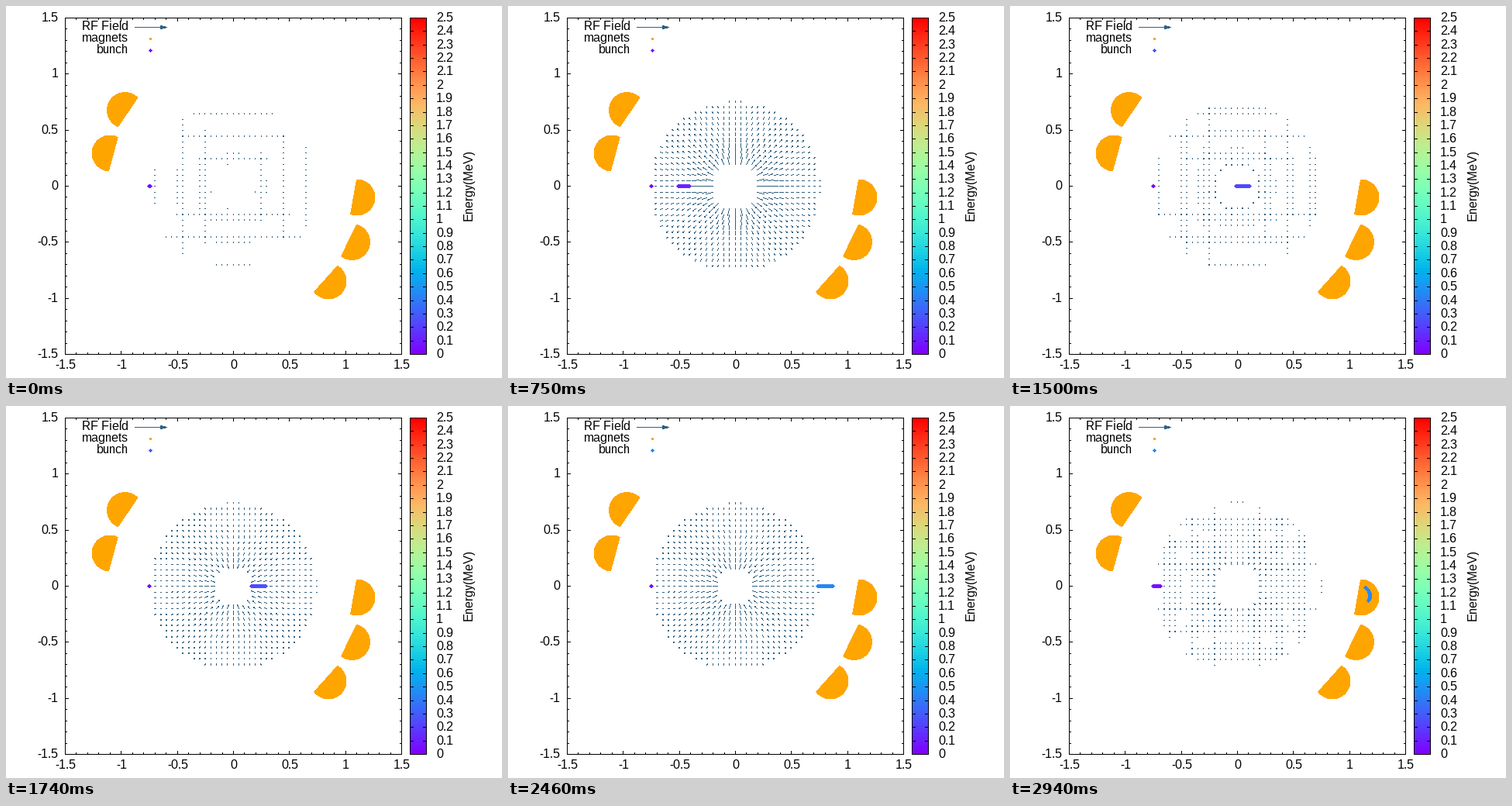
Recreate the animation shown at these times as a matplotlib script. Size 640 by 480 pixels, loop 2.97 s.

```python
import numpy as np
import matplotlib.pyplot as plt
from matplotlib.animation import FuncAnimation

W, H = 640, 480
FRAMES, STEP_MS = 99, 30
PERIOD, LAG = 93.02, 1.29                 # RF cycle and phase lag, in frames
LEFT, RIGHT, TOP, BOTTOM = 76, 510, 15, 449
CX, CY, UNIT = 293, 232, 434 / 3          # plot centre, px per axis unit
CELL = UNIT / 20
BAR_L, BAR_R, BAR_STEP = 521, 542, 434 / 25
STEEL, ORANGE, BLACK = (48, 96, 128), (255, 165, 0), (0, 0, 0)

FIELD_PX = 35                             # arrow length one cell from the centre
GAIN, T0, REST = 0.18, 0.04, 0.511        # MeV
LIGHT = 4.337                             # px per frame
SOURCE_X = 184.6
BEND_X, BEND_R = 451.5, 12.5              # entry and turning radius in the magnet


def wave(t):
    return np.sin(2 * np.pi * (t - LAG) / PERIOD)


def palette(x):
    x = np.asarray(x, float)
    rgb = np.stack([abs(2 * x - 0.5), np.sin(np.pi * x), np.cos(np.pi * x / 2)], -1)
    return (255 * np.clip(rgb, 0, 1)).round().astype(np.uint8)


def magnet(img, cx, cy, tilt, r=23.5, depth=5):
    """Disc cut by a chord just behind its centre, bulging towards tilt."""
    y, x = np.mgrid[0:H, 0:W]
    x, y, a = x - cx, y - cy, np.radians(tilt)
    img[(x * x + y * y <= r * r) & (x * np.cos(a) + y * np.sin(a) >= -depth)] = ORANGE


def box(img, x0, x1):
    img[[TOP, BOTTOM], x0:x1 + 1] = BLACK
    img[TOP:BOTTOM + 1, [x0, x1]] = BLACK


def diamond(img, x, y, color):
    for d in range(-2, 3):
        n = 2 - abs(d)
        img[y + d, x - n:x + n + 1] = color


def background():
    img = np.full((H, W, 3), 255, np.uint8)
    magnet(img, 153, 134, 214)
    magnet(img, 133.5, 189.5, 195)
    magnet(img, 452.5, 246.5, 10)
    magnet(img, 446, 304, 26)
    magnet(img, 415.5, 354.5, 42)

    box(img, LEFT, RIGHT)
    for k in range(31):
        n = 2 if k % 5 else 4
        d = round(k * UNIT / 10)
        x, y = LEFT + d, BOTTOM - d
        img[TOP:TOP + n + 1, x] = img[BOTTOM - n:BOTTOM + 1, x] = BLACK
        img[y, LEFT:LEFT + n + 1] = img[y, RIGHT - n:RIGHT + 1] = BLACK

    level = np.floor(np.linspace(1, 0, BOTTOM - TOP + 1) * 127.99) / 127
    img[TOP:BOTTOM + 1, BAR_L:BAR_R + 1] = palette(level)[:, None]
    box(img, BAR_L, BAR_R)
    for k in range(26):
        y = BOTTOM - round(k * BAR_STEP)
        img[y, BAR_L:BAR_L + 5] = img[y, BAR_R - 4:BAR_R + 1] = BLACK

    img[27, 166:208] = STEEL
    for k in range(9):
        n = round(k * 0.27)
        img[27 - n:28 + n, 207 - k] = STEEL
    img[41:44, 185:188] = ORANGE
    return img


# Cavity grid, in cells
gi, gj = np.meshgrid(np.arange(-14, 16), np.arange(-14, 16))
r2 = gi ** 2 + gj ** 2
inside = (r2 > 14) & (r2 < 228)
gi, gj, r2 = gi[inside], gj[inside], r2[inside]


def draw_field(img, f):
    a = FIELD_PX * wave(f)
    snap = lambda v: np.floor(v + 0.06).astype(int)
    x0, y0 = snap(gi * CELL), snap(gj * CELL)
    dx = snap(gi * CELL + a * gi / r2) - x0
    dy = snap(gj * CELL + a * gj / r2) - y0
    n = np.maximum(abs(dx), abs(dy))
    live = n > 0
    x0, y0, dx, dy, n = (v[live] for v in (x0, y0, dx, dy, n))

    def plot(x, y):
        img[CY - y, CX + x] = STEEL

    for k in range(n.max() + 1 if n.size else 0):
        t = np.minimum(k / n, 1)
        plot(x0 + np.floor(t * dx + 0.5).astype(int),
             y0 + np.floor(t * dy + 0.5).astype(int))
    # tiny arrow heads, cut to whole pixels
    head = 1.7 * np.exp(1j * np.arctan2(dy, dx))
    for side in (-1, 1):
        barb = head * np.exp(1j * side * np.radians(15))
        plot(x0 + dx - barb.real.astype(int), y0 + dy - barb.imag.astype(int))


def simulate(sub=20):
    """Distance along the path and energy of every electron, frame by frame."""
    burst = np.linspace(-0.86, 7.1, 40)
    born = np.concatenate([burst, burst + PERIOD])
    s = np.full(born.size, SOURCE_X)
    energy = np.full(born.size, T0)
    track = []
    for step in range(-sub, FRAMES * sub):
        t = step / sub
        if step >= 0 and step % sub == 0:
            track.append((s.copy(), energy.copy()))
        speed = LIGHT * np.sqrt(1 - (1 + energy / REST) ** -2)
        ds = np.where(t >= born, speed / sub, 0)
        x = s - CX
        in_field = (abs(x) > 0.188 * UNIT) & (abs(x) < 0.753 * UNIT)
        energy -= np.where(in_field, GAIN * wave(t) / np.where(in_field, x, 1), 0) * ds
        s += ds
    return track


def on_path(s):
    """Straight through the cavity, then round inside the first magnet."""
    ang = max(s - BEND_X, 0) / BEND_R
    x = min(s, BEND_X) + BEND_R * np.sin(ang)
    return round(x), round(CY + BEND_R * (1 - np.cos(ang)))


plt.rcParams["text.hinting"] = "default"
plt.rcParams["text.hinting_factor"] = 1
fig = plt.figure(figsize=(W / 100, H / 100), dpi=100, facecolor="white")
ax = fig.add_axes([0, 0, 1, 1])
ax.axis("off")
base = background()
track = simulate()
view = ax.imshow(base, extent=(0, W, H, 0), interpolation="nearest", aspect="auto")
ax.set_xlim(0, W)
ax.set_ylim(H, 0)


def label(x, y, s, ha="center", va="baseline", **kw):
    ax.text(x, y, s, ha=ha, va=va, family="Liberation Sans", fontsize=11.52,
            color="black", **kw)


for k in range(7):
    v = f"{k / 2 - 1.5:g}"
    label(LEFT + 1 + k * UNIT / 2, 468.5, v)
    label(67.5, BOTTOM + 5 - k * UNIT / 2, v, "right")
for k in range(26):
    label(555, BOTTOM + 5 - k * BAR_STEP, f"{k / 10:g}", "left")
for k, s in enumerate(["RF Field", "magnets", "bunch"]):
    label(157.5, 31 + 15 * k, s, "right")
label(605, 231, "Energy(MeV)", "right", "center", rotation=90)


def draw(f):
    img = base.copy()
    draw_field(img, f)
    s, energy = track[f]
    colors = palette(energy / 2.5)
    for pos, color in zip(s, colors):
        diamond(img, *on_path(pos), color)
    diamond(img, int(SOURCE_X), CY, palette(T0 / 2.5))
    diamond(img, 186, 57, colors[0])
    view.set_data(img)
    return [view]


anim = FuncAnimation(fig, draw, frames=FRAMES, interval=STEP_MS, repeat=True,
                     repeat_delay=0, blit=False)
plt.show()
```
